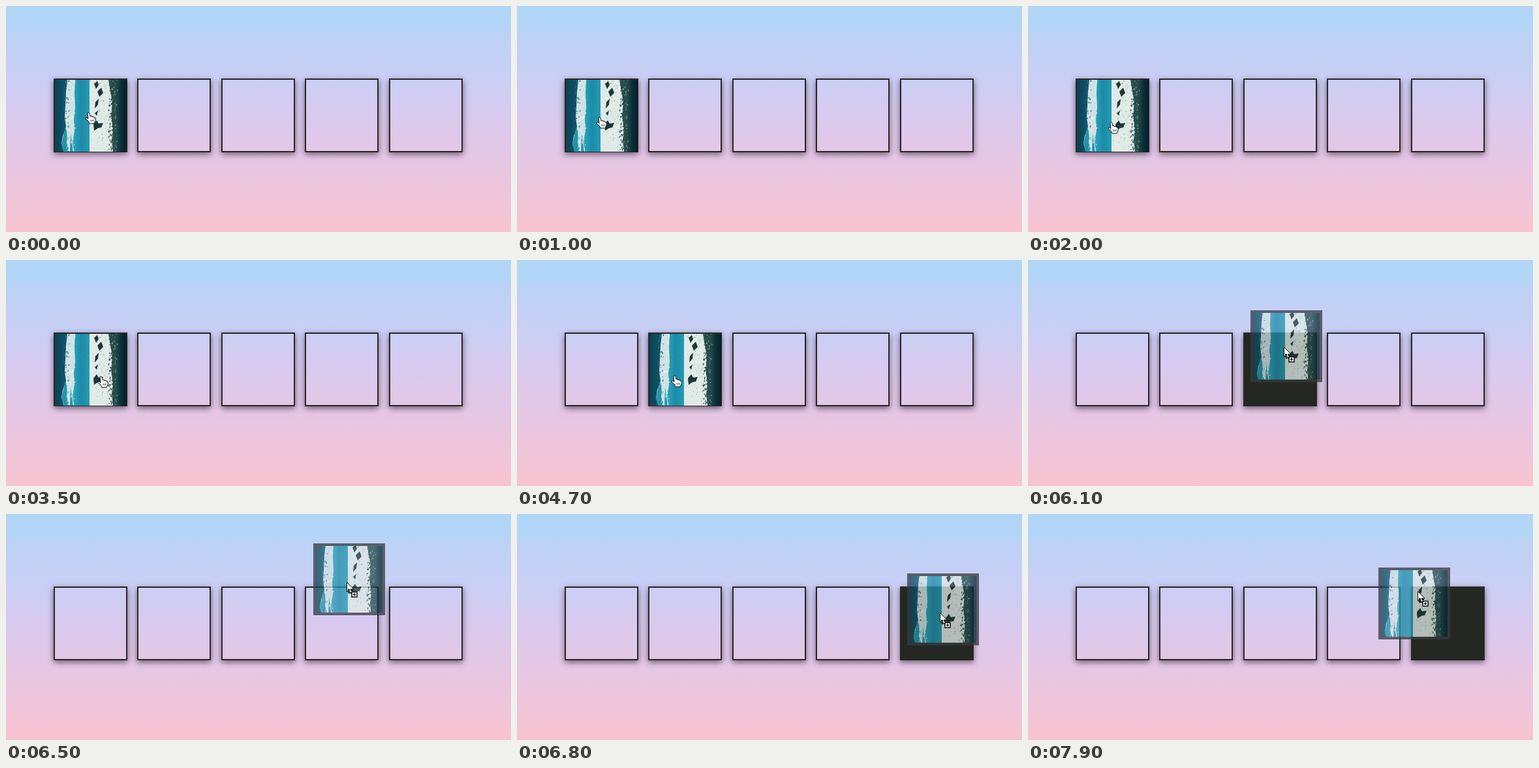
An HTML page for the animation above (8 s loop, 774x346 px).

```html
<!DOCTYPE html>
<html lang="en">
<head>
<meta charset="utf-8">
<title>Drag and drop</title>
<style>
  html, body { margin: 0; width: 100%; height: 100%; overflow: hidden; }
  body {
    position: relative;
    background: linear-gradient(#b0d6f8 0, #b3d5f7 36px, #bcd2f5 42px, #c9cff5 108px,
      #d8caef 165px, #e6c7e3 240px, #f8c3d0 346px);
  }
  .box {
    position: absolute; top: 111px; width: 113px; height: 113px;
    box-sizing: border-box; border: 2px solid #2d2723;
    box-shadow: 0 3px 9px rgba(25, 15, 35, .6);
  }
  .over { background: #252822; border-color: #252822; }
  svg { position: absolute; left: 0; top: 0; display: block; }
</style>
</head>
<body>
<svg id="stage" width="774" height="346" viewBox="0 0 774 346">
  <defs>
    <linearGradient id="deep">
      <stop offset="0" stop-color="#0b4055"/>
      <stop offset=".16" stop-color="#11566a"/>
      <stop offset=".84" stop-color="#28504f"/>
      <stop offset=".92" stop-color="#0b3038"/>
      <stop offset="1" stop-color="#061e27"/>
    </linearGradient>
    <linearGradient id="shallow">
      <stop offset="0" stop-color="#2ba6bd"/>
      <stop offset=".5" stop-color="#1c8ba8"/>
      <stop offset="1" stop-color="#259bb3"/>
    </linearGradient>
    <clipPath id="frame"><rect width="110" height="110"/></clipPath>
    <g id="photo" clip-path="url(#frame)">
      <rect width="110" height="110" fill="url(#deep)"/>
      <path fill="#cfe2e4" d="M19 0 17 18 16 40 15 58 17 72 12 86 10 98 14 110H36V0Z"/>
      <path fill="#2396ae" d="M16 72Q20 84 18 96L22 110H13L10 98ZM24 82 28 110H23Z"/>
      <path fill="url(#shallow)" d="M31 0 30 20 31 42 29 60 30 78 27 94 29 110H53V0Z"/>
      <path fill="#e0ebe7" d="M53 0H82L85 18 88 34 86 55 89 76 87 92 89 110H53Z"/>
      <g id="specks"></g>
      <path fill="#1d3638" d="M60 6 65 2 67 8 63 14ZM65 18 71 12 74 20 68 26ZM62 34 67 29 66 38
        61 44ZM59 68 64 62 67 67 74 66 71 73 66 74 60 78ZM61 51 66 47 64 55Z"/>
    </g>
  </defs>
  <use id="placed" href="#photo"/>
  <g id="ghost" opacity=".76">
    <use href="#photo"/>
    <rect x="2" y="2" width="106" height="106" fill="none" stroke="#393a40" stroke-width="4"/>
  </g>
  <g id="hand" stroke="#111" stroke-linejoin="round">
    <path fill="#fff" d="M-1 1Q0-1 2 1L3 6 5 5 6 7 8 6 9 8 11 8Q12 12 10 15L9 17H2L0 13-4 10Q-5 7-2 8L0 10Z"/>
    <path fill="none" stroke-width=".7" d="M4 11V14M6 11V14M8 11V14"/>
  </g>
  <g id="arrow" stroke="#111">
    <path fill="#fff" d="M.5.5V15L4 12 6 17 8.500 16 6.500 11H11Z"/>
    <path fill="none" stroke-width="2" stroke-dasharray="2 1" d="M3 12H9V17H3Z"/>
    <path fill="#fff" stroke-width="1.500" d="M8 15.500H16V23H8Z"/>
    <path fill="none" stroke-width="1.500" d="M10 19.250H14M12 17.250V21.250"/>
  </g>
</svg>
<script>
const LOOP = 8000, STEP = 100;
const $ = id => document.getElementById(id);
const boxLeft = i => Math.round(72.5 + 128.5 * i);

const boxes = Array.from({ length: 5 }, (_, i) => {
  const box = document.createElement('div');
  box.className = 'box';
  box.style.left = boxLeft(i) + 'px';
  document.body.insertBefore(box, $('stage'));
  return box;
});

let seed = 41;
const random = () => (seed = seed * 16807 % 2147483647) / 2147483647;

// Scatter small blots in a vertical band of the photo.
function scatter(count, x, width, size, color) {
  let d = '';
  for (let i = 0; i < count; i++) {
    const px = x + width * random(), py = 110 * random();
    const w = size * (.4 + random()), h = size * (.6 + 1.5 * random());
    d += `M${px.toFixed(1)} ${py.toFixed(1)}l${w.toFixed(1)} ${(-h / 2).toFixed(1)} ${(-w / 3).toFixed(1)} ${h.toFixed(1)}z`;
  }
  return `<path fill="${color}" d="${d}"/>`;
}
$('specks').innerHTML =
  scatter(45, 13, 8, 2, '#27768a') +
  scatter(35, 18, 11, 2.2, '#f0f8f6') +
  scatter(40, 31, 20, 1, '#147b98') +
  scatter(90, 54, 32, 1.6, '#b4c8c4') +
  scatter(35, 62, 22, 1.4, '#5f7d79') +
  scatter(130, 81, 13, 2.3, '#244543') +
  scatter(45, 84, 11, 1.5, '#a9bdb7');

// time, pointer x, y, grip x, y within the photo
const track = [
  [0, 126, 163, 71, 66],
  [1000, 126, 170, 71, 66],
  [2000, 127, 178, 71, 66],
  [2800, 136, 178, 71, 66],
  [3300, 144, 178, 71, 66],
  [3600, 145, 178, 71, 66],
  [4300, 241, 177, 71, 66],
  [4800, 241, 177, 51, 56],
  [5300, 254, 169, 51, 56],
  [6100, 392, 133, 51, 56],
  [6400, 480, 88, 51, 58],
  [6800, 648, 151, 50, 60],
  [7000, 649, 153, 50, 60],
  [7400, 649, 149, 60, 36],
  [7900, 597, 118, 60, 36],
  [LOOP, 594, 117, 60, 36]
];
// start, end
const drags = [[3700, 4400], [5400, 7000], [7500, LOOP]];
// landing time, box
const homes = [[0, 0], [4400, 1], [7000, 4]];

function sample(t) {
  const n = track.findIndex(key => key[0] > t);
  const a = track[n - 1], b = track[n], k = (t - a[0]) / (b[0] - a[0]);
  return a.slice(1).map((v, i) => v + (b[i + 1] - v) * k);
}
const show = (node, on) => node.setAttribute('visibility', on ? 'visible' : 'hidden');
const move = (node, x, y) =>
  node.setAttribute('transform', `translate(${Math.round(x)} ${Math.round(y)})`);

function draw(time) {
  const t = Math.floor(time % LOOP / STEP) * STEP;
  const [x, y, gripX, gripY] = sample(t);
  const dragging = drags.some(([from, to]) => t >= from && t < to);
  const home = homes.filter(([at]) => at <= t).pop()[1];

  boxes.forEach((box, i) => {
    const dx = x - boxLeft(i);
    const inside = dx >= 0 && dx < 113 && y >= 111 && y < 224;
    box.classList.toggle('over', dragging && inside);
  });
  move($('placed'), boxLeft(home) + 2, 113);
  move($('ghost'), x - gripX, y - gripY);
  move($('hand'), x, y);
  move($('arrow'), x, y);
  show($('placed'), !dragging);
  show($('ghost'), dragging);
  show($('hand'), !dragging);
  show($('arrow'), dragging);
}

const start = performance.now();
function tick() {
  draw(performance.now() - start);
  requestAnimationFrame(tick);
}
tick();
</script>
</body>
</html>
```
